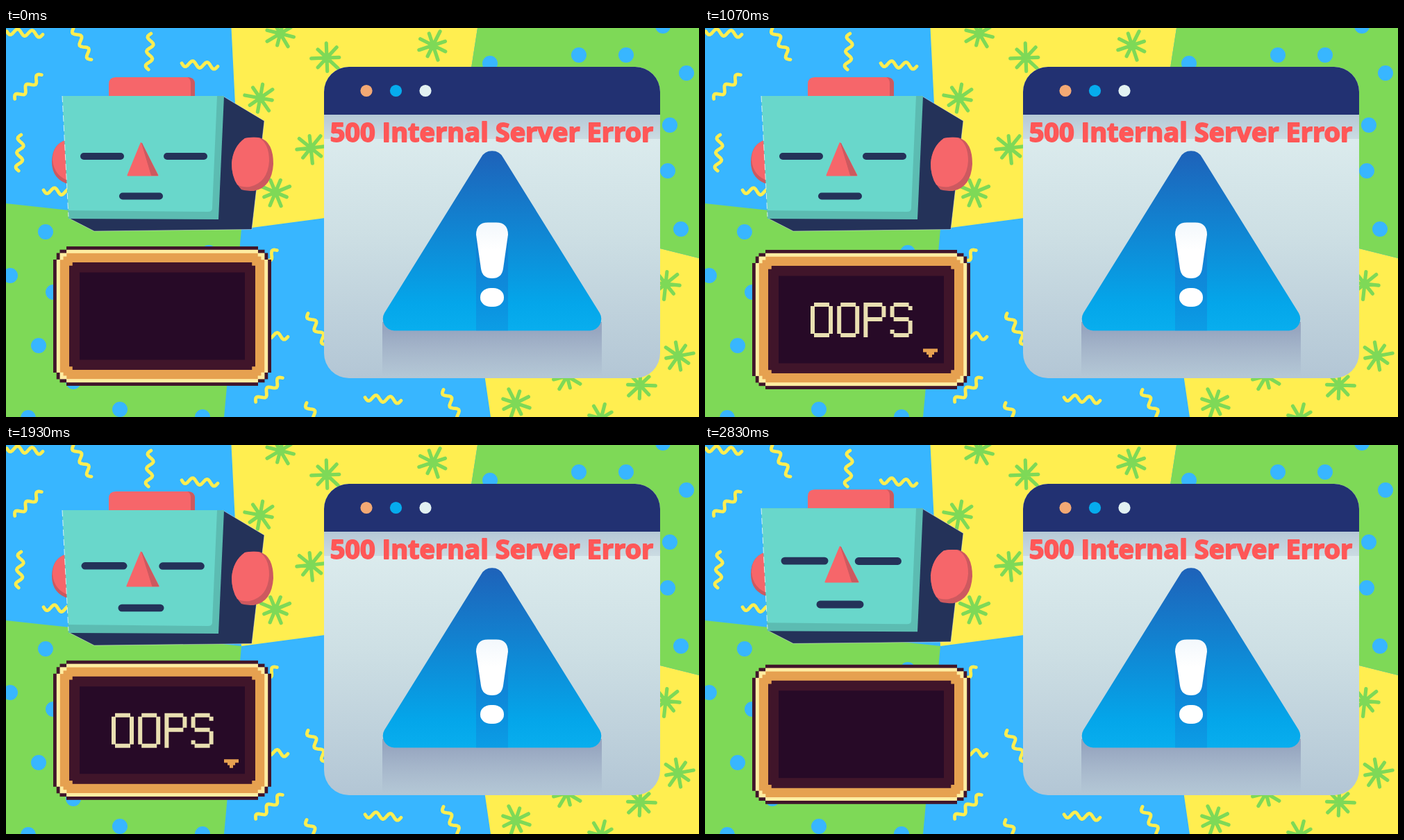
An HTML page that plays this animation: 998x561 px, repeating every 2860 ms.

```html
<!DOCTYPE html>
<html lang="en">
<head>
<meta charset="utf-8">
<title>500 Internal Server Error</title>
<style>
  html, body { margin: 0; width: 100%; height: 100%; overflow: hidden; }
  svg { display: block; width: 100%; height: 100%; }
  text { font: 700 38px "Open Sans", "Noto Sans", sans-serif; }
</style>
</head>
<body>
<svg viewBox="0 0 998 561">
  <defs>
    <linearGradient id="body" gradientUnits="userSpaceOnUse" x1="0" y1="160" x2="0" y2="505">
      <stop stop-color="#dbebed"/><stop offset=".4" stop-color="#cddfe4"/><stop offset="1" stop-color="#b3c6d5"/>
    </linearGradient>
    <linearGradient id="strip" x2="0" y2="1">
      <stop stop-color="#b5c8d6"/><stop offset="1" stop-color="#cbdbe2"/>
    </linearGradient>
    <linearGradient id="tri" x2="0" y2="1">
      <stop stop-color="#1e62b9"/><stop offset=".85" stop-color="#04a6ea"/><stop offset="1" stop-color="#08aeee"/>
    </linearGradient>
    <linearGradient id="drop" x2="0" y2="1">
      <stop offset=".15" stop-color="#97a6c0"/><stop offset="1" stop-color="#97a6c0" stop-opacity="0"/>
    </linearGradient>
    <linearGradient id="shade" x2="0" y2="1">
      <stop offset=".4" stop-color="#1673cf" stop-opacity=".5"/><stop offset="1" stop-color="#1673cf" stop-opacity=".28"/>
    </linearGradient>
    <linearGradient id="mark" x2="0" y2="1">
      <stop stop-color="#f3f8fc"/><stop offset=".5" stop-color="#fff"/>
    </linearGradient>
    <clipPath id="frame"><rect x="458" y="56" width="484" height="449" rx="36"/></clipPath>
  </defs>

  <!-- patchwork background -->
  <path fill="#38b6ff" d="M0 0H998V561H0Z"/>
  <path fill="#ffee50" d="M324.500 0H679L640 250 339 290ZM660 300 942 318 998 332V561H698Z"/>
  <path fill="#7ed957" d="M679 0H998V332L942 318 640 250ZM0 253 339 290 314 561H0Z"/>
  <path fill="none" stroke="#38b6ff" stroke-width="22" stroke-linecap="round"
    d="M57 294h0M6 357h0M47 458h0M68 381h0M32 562h0M164 550h0M283 561h0M97 510h0M292 324h0
       M697 51h0M825 39h0M893 39h0M946-3h0M980 65h0M956 140h0M953 206h0M972 290h0"/>
  <path id="stars" fill="none" stroke="#7ed957" stroke-width="5.2" stroke-linecap="round"/>
  <path id="squiggles" fill="none" stroke="#ffee50" stroke-width="4.8" stroke-linecap="round" stroke-linejoin="round"/>

  <!-- browser window -->
  <g clip-path="url(#frame)">
    <path fill="url(#body)" d="M458 56H942V505H458Z"/>
    <path fill="url(#strip)" d="M458 124H942V160H458Z"/>
    <path fill="#223172" d="M458 56H942V125H458Z"/>
    <path fill="url(#drop)" d="M542 424H858V502H542Z"/>
  </g>
  <circle cx="519" cy="90.500" r="8.600" fill="#f3a974"/>
  <circle cx="561.500" cy="90.500" r="8.600" fill="#06aced"/>
  <circle cx="604" cy="90.500" r="8.600" fill="#e2f1f2"/>
  <path fill="url(#tri)" d="M684 187A18 18 0 0 1 716 187L855 411A17 17 0 0 1 841 436.500H559A17 17 0 0 1 545 411Z"/>
  <path fill="url(#shade)" d="M677 300H723V436.500H677Z"/>
  <path fill="url(#mark)" d="M677 298Q677 280.500 694 280.500H706Q723 280.500 723 298L716 347Q714 361 700 361 686 361 684 347Z"/>
  <rect x="683" y="375" width="34" height="27" rx="15" ry="13" fill="#fff"/>
  <text x="699.500" y="163.500" text-anchor="middle" fill="#ff5757" stroke="#ff5757" stroke-width="1.800" stroke-linejoin="round">500 Internal Server Error</text>

  <!-- robot -->
  <g id="head">
    <path fill="#f6666a" d="M148 100V81Q148 71 158 71H262Q272 71 272 81V100Z"/>
    <path fill="#cd595f" d="M261 71Q272 71 272 81V100H266V80Q266 73 261 71Z"/>
    <path fill="#cd595f" d="M92 160Q66 165 66 193 66 219 92 226Z"/>
    <path fill="#f6666a" d="M92 160Q67 165 67 190 69 214 92 221Z"/>
    <path fill="#243259" stroke="#fff" stroke-opacity=".4" d="M312 98 372 134 354 290.500 127 293 90 274Z"/>
    <path fill="#5cbcb2" d="M81 98H314L306 276 90 275Z"/>
    <path fill="#69d7cb" d="M81 98H304L297 260Q297 265 291 265L90 263Z"/>
    <path fill="none" stroke="#fff" stroke-opacity=".75" stroke-dasharray="9 5" d="M81 98 90 272"/>
    <path fill="#cd595f" d="M344 159Q354 157 365 158 385 164 385 196 383 230 357 235 346 235 339 233 325 218 325 195 327 171 344 159Z"/>
    <path fill="#f6666a" d="M344 159Q352 157 363 158 379 165 379 192 377 223 351 229 340 230 333 226 325 214 325 195 327 171 344 159Z"/>
  </g>
  <g fill="none" stroke="#243259" stroke-linecap="round">
    <path id="eyeL"/><path id="eyeR"/><path id="mouth"/>
  </g>
  <path id="nose" fill="#f6666a" stroke="#f6666a" stroke-width="2" stroke-linejoin="round"/>
  <path id="noseShade" fill="#cd595f" stroke="#cd595f" stroke-linejoin="round"/>

  <!-- pixel sign -->
  <g id="sign">
    <g id="border"></g>
    <path fill="#270a27" d="M106 352.500H344V478.500H106Z"/>
    <g id="word" fill="none" stroke="#e9dfb1" stroke-width="6"></g>
    <path id="arrow" fill="#e6a150" d="M314 457.500H335V462.500H330V466H327V470H322V466H319V462.500H314Z"/>
  </g>
</svg>
<script>
const LOOP = 2860;
const $ = id => document.getElementById(id);
const lerp = (a, b, k) => a + (b - a) * k;

// Eight uneven spokes, each burst turned a little further than the last
const burst = ([x, y], n) => {
  let d = '';
  for (let i = 0; i < 8; i++) {
    const a = i * Math.PI / 4 + .25 + n / 2, r = 20 + 2.500 * Math.sin(i * 2.400 + n);
    d += `M${x} ${y}l${r * Math.cos(a)} ${r * Math.sin(a)}`;
  }
  return d;
};
$('stars').setAttribute('d', [
  [395, 8], [462, 43], [615, 25], [366, 101], [439, 173], [388, 237],
  [950, 369], [968, 473], [734, 541], [913, 515], [808, 502], [857, 563]
].map(burst).join(''));

// A wave of fixed length around a centre, along one direction
const squiggle = (x, y, degrees) => {
  const a = degrees * Math.PI / 180, c = Math.cos(a), s = Math.sin(a), pts = [];
  for (let u = -26; u <= 26; u += 2) {
    const v = 4.600 * Math.sin((u + 26) / 52 * Math.PI * 5);
    pts.push(`${x + u * c - v * s} ${y + u * s + v * c}`);
  }
  return 'M' + pts.join('L');
};
const waves = {
  5: [[27, 7], [279, 53], [80, 236], [380, 443], [543, 535]],
  60: [[110, 23], [448, 434], [446, 563], [643, 544]],
  94: [[207, 34], [20, 180]],
  138: [[32, 85], [379, 522], [371, 338]]
};
$('squiggles').setAttribute('d', Object.entries(waves)
  .flatMap(([angle, spots]) => spots.map(([x, y]) => squiggle(x, y, angle))).join(''));

// Stair-cornered box: overlapping rects, inset in x and y by opposite ends of the steps
const stairBox = (inset, fill, ...steps) => {
  const u = 4.750;
  return steps.map((s, i) => {
    const x = inset + s * u, y = inset + steps[steps.length - 1 - i] * u;
    return `<rect x="${68 + x}" y="${315 + y}" width="${314 - 2 * x}" height="${201 - 2 * y}" fill="${fill}"/>`;
  }).join('');
};
$('border').innerHTML =
  stairBox(0, '#40152a', 4, 2, 1, 0) +
  stairBox(4.800, '#ffeda2', 3, 1, 0) +
  stairBox(9.800, '#e6a150', 2, 1, 0) +
  stairBox(23, '#40152a', 1, 0);

const glyphs = {
  O: 'M5 3H27M5 47H27M3 5V45M29 5V45',
  P: 'M0 3H27M3 5V50M29 5V21M5 24H27',
  S: 'M5 3H27M29 5V11M3 5V21M5 24H27M29 26V45M5 47H27M3 39V45'
};
$('word').innerHTML = [...'OOPS'].map((c, i) =>
  `<path transform="translate(${152 + i * 38.200} 391)" d="${glyphs[c]}"/>`).join('');
const letters = [...$('word').children];

// Head: soft at the top, sharp at the bottom
const lift = t => {
  const turns = (t - 550) / 1075, away = 2 * Math.abs(turns - Math.round(turns));
  return Math.max(0, 1 - 1.050 * away ** 1.300);
};
// Sign: steady drift up and down, from -1 to 1
const sway = t => {
  const k = (t / 1475 + .25) % 1;
  return 1 - 4 * Math.min(k, 1 - k);
};

const bar = (id, low, high, k) => {
  const [x1, x2, y] = low.map((v, i) => lerp(v, high[i], k));
  $(id).setAttribute('d', `M${x1} ${y}H${x2}`);
  $(id).setAttribute('stroke-width', lerp(10, 11, k));
};

function draw() {
  const t = performance.now() % LOOP, k = lift(t);
  $('head').setAttribute('transform', `translate(0 ${-8 * k})`);
  bar('eyeL', [112, 165, 185], [115.500, 173.500, 163.500], k);
  bar('eyeR', [232, 285, 185], [219, 276, 164], k);
  bar('mouth', [168, 221, 242.500], [165.500, 223.500, 227.500], k);

  const top = lerp(166, 143, k), base = lerp(212.500, 194.500, k);
  const left = lerp(175.500, 173, k), right = lerp(218.500, 221, k);
  $('nose').setAttribute('d', `M194.500 ${top}L${right} ${base}H${left}Z`);
  $('noseShade').setAttribute('d', `M195.500 ${top}L${right} ${base}H${right - 9}Z`);

  $('sign').setAttribute('transform', `translate(0 ${5.500 * sway(t)})`);
  const shown = t < 2700 ? Math.floor(t / 230) : 0;
  letters.forEach((el, i) => el.style.display = i < shown ? '' : 'none');
  $('arrow').style.display = shown > letters.length - 1 && t >= 1040 ? '' : 'none';
  requestAnimationFrame(draw);
}
draw();
</script>
</body>
</html>
```
